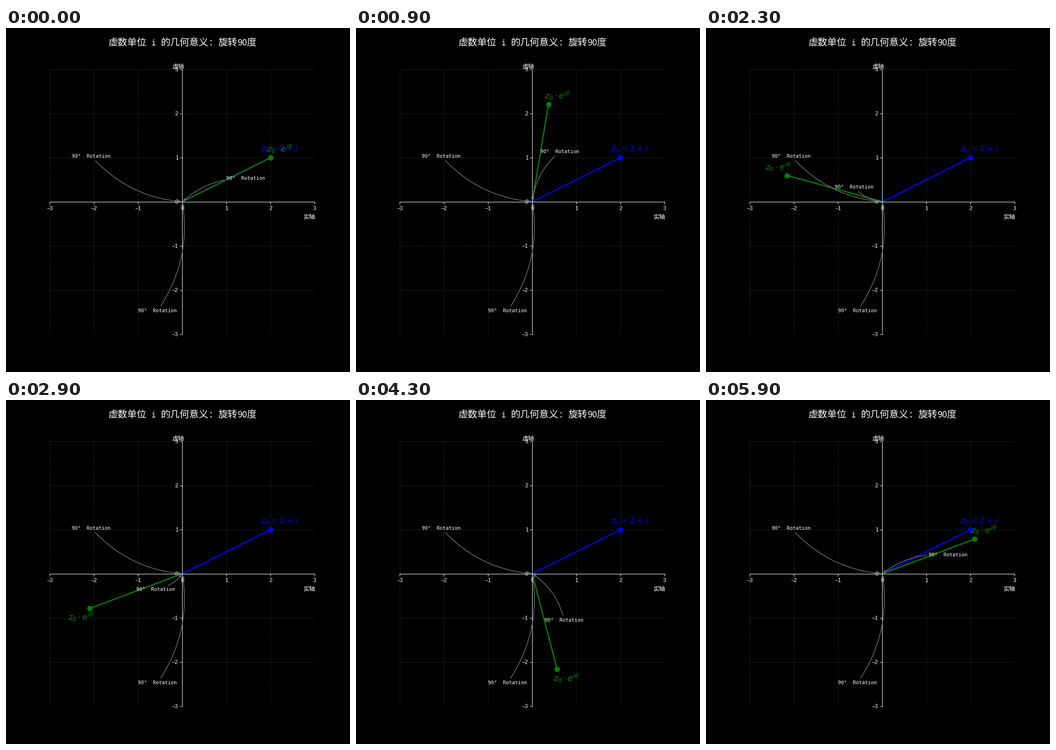
Animation of 748 by 748 pixels, one loop 6000 ms. Source, as a matplotlib script:

```python
import numpy as np
import matplotlib.pyplot as plt
from matplotlib.animation import FuncAnimation

SIZE = 748
FRAMES = 60
CJK, SANS, MONO = "Noto Sans CJK JP", "Liberation Sans", "DejaVu Sans Mono"
Z0 = 2 + 1j

plt.rcParams["axes.unicode_minus"] = True
fig, ax = plt.subplots(figsize=(8, 8), dpi=SIZE / 8, facecolor="black")


def put(x, y, text, font, size):
    """Place text with its baseline start at a pixel, counted from the top left."""
    fig.text(x / SIZE, 1 - y / SIZE, text, color="white", family=font, fontsize=size)


def note(x, y):
    """Label with a curved arrow to the origin."""
    return ax.annotate(
        "90°  Rotation", xy=(0, 0), xytext=(x, y), color="white",
        family=MONO, fontsize=8.33,
        arrowprops=dict(arrowstyle="->", color="gray", mutation_scale=10,
                        connectionstyle="arc3,rad=0.2"))


def vector(color, label):
    line, = ax.plot([], [], color=color, lw=2)
    dot, = ax.plot([], [], "o", color=color, ms=8)
    text = ax.text(0, 0, label, color=color, fontsize=14, ha="center", va="center")
    return line, dot, text


def point_to(parts, z):
    line, dot, text = parts
    line.set_data([0, z.real], [0, z.imag])
    dot.set_data([z.real], [z.imag])
    text.set_position((z.real + 0.2 * np.sign(z.real),
                       z.imag + 0.2 * np.sign(z.imag)))


# Axes through the origin
ax.set_facecolor("black")
ax.set(xlim=(-3, 3), ylim=(-3, 3), aspect="equal",
       xticks=range(-3, 4), yticks=range(-3, 4))
ax.grid(color="gray", linestyle="--", alpha=0.3)
ax.tick_params(color="white", labelcolor="white")
for side in ("left", "bottom"):
    ax.spines[side].set_position("zero")
    ax.spines[side].set_color("white")
for side in ("right", "top"):
    ax.spines[side].set_visible(False)
for label in ax.get_xticklabels() + ax.get_yticklabels():
    label.set(family=SANS, fontsize=9.2)

put(361.6, 88, "虚轴", CJK, 10)
put(645.6, 415, "实轴", CJK, 10)

# Title runs sit on a grid of half-width cells
cell = 10.4
for column, text, font, size in [
    (0, "虚数单位", CJK, 16), (9, "i", MONO, 13.3), (11, "的几何意义", CJK, 16),
    (21.2, ":", CJK, 16), (23, "旋转", CJK, 16), (27, "90", CJK, 14.5),
    (29, "度", CJK, 16),
]:
    put(222.2 + column * cell, 38.4, text, font, size)

start = vector("blue", r"$z_0 = 2 + i$")
point_to(start, Z0)
turned = vector("green", r"$z_0 \cdot e^{i\theta}$")
note(-2.5, 1)
note(-1, -2.5)
moving = note(1, 0.5)


def update(frame):
    z = Z0 * np.exp(2j * np.pi * frame / FRAMES)
    point_to(turned, z)
    moving.set_position((z.real / 2, z.imag / 2))
    return (*turned, moving)


anim = FuncAnimation(fig, update, frames=FRAMES, interval=100,
                     repeat=True, repeat_delay=0)
plt.show()
```
